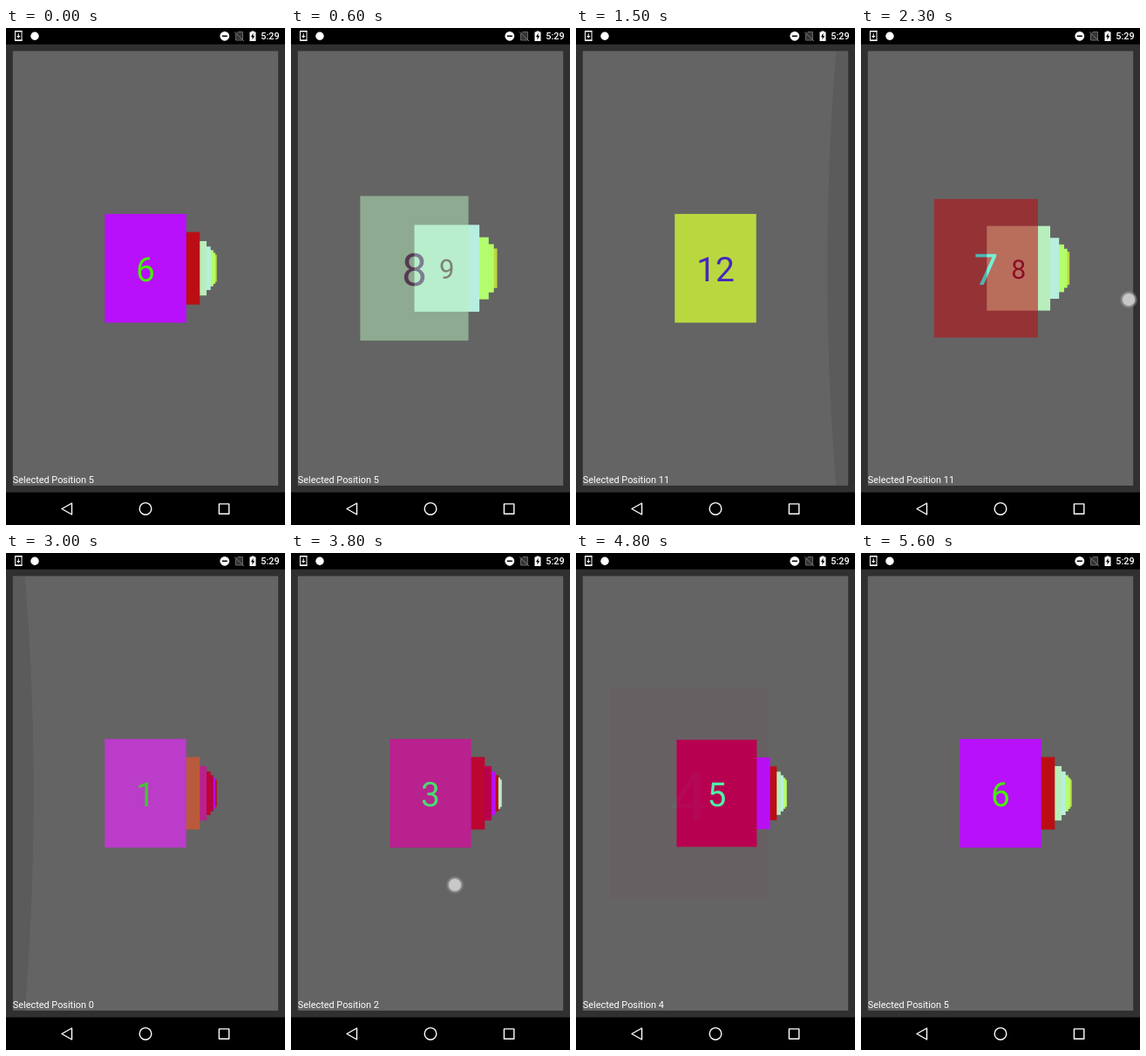
Recreate the animation shown at these times as an HTML page. Size 320 by 569 pixels, loop 5.7 s.

```html
<!DOCTYPE html>
<html>
<head>
<meta charset="utf-8">
<style>
html, body { margin: 0; width: 100%; height: 100%; overflow: hidden; background: #000; }
svg { display: block; width: 320px; height: 569px; font: 10.9px Roboto, sans-serif; fill: #fff; }
.card text { font-size: 38.9px; text-anchor: middle; text-rendering: geometricPrecision; }
.line { fill: none; stroke: #fff; }
</style>
</head>
<body>
<svg viewBox="0 0 320 569">
  <rect width="320" height="569" fill="#303030"/>
  <rect x="7.8" y="26.4" width="304.4" height="497.5" fill="#646464"/>
  <g id="cards"></g>
  <path id="leftGlow" fill="#000" fill-opacity=".09"/>
  <path id="rightGlow" fill="#000" fill-opacity=".09"/>
  <text id="label" x="7.8" y="521"/>

  <g id="statusBar">
    <rect width="320" height="18.7" fill="#000"/>
    <rect class="line" x="10.5" y="3.5" width="7.5" height="11"/>
    <path d="M10 4h8.5M10 13.8h8.5M14.3 6.3v3" class="line"/>
    <path d="M12 9h4.6l-2.3 2.6z"/>
    <circle cx="33" cy="9.3" r="4.7"/>
    <circle cx="250.8" cy="9.3" r="5.4"/>
    <path d="M247.8 8.5h6v1.6h-6z" fill="#000"/>
    <path d="M266 4.5h5.5V14h-8V7z" fill="#333" stroke="#666"/>
    <path d="M262 4.5l11 10.5" stroke="#777"/>
    <path d="M279.5 4.5h2V3.4h3v1.1h2V15h-7z"/>
    <path d="M283.6 5.8l-2.7 4.5h1.7l-.2 3.3 2.8-4.6h-1.7z" fill="#000"/>
    <text x="292.3" y="13.4" font-weight="500">5:29</text>
  </g>
  <g id="navigationBar" stroke-width="1.4" stroke-linejoin="round">
    <rect y="531.6" width="320" height="38" fill="#000"/>
    <path class="line" d="M64 550.5l11.5-6.5v13z"/>
    <circle class="line" cx="160" cy="550.4" r="6.8"/>
    <rect class="line" x="244.4" y="544.9" width="11.4" height="11.4"/>
  </g>
  <g id="touch">
    <circle r="10" fill="#999" fill-opacity=".35"/>
    <circle r="8.5" fill="#999" fill-opacity=".8"/>
    <circle r="7" fill="#c8c8c8"/>
  </g>
</svg>
<script>
const LOOP = 5700, STEP = 100;
const CARD_W = 93.4, CARD_H = 124.5, VISIBLE_AHEAD = 6;
const byId = id => document.getElementById(id);

const palette = ['#ba3cc8', '#ba5a3c', '#b9218f', '#bc0632', '#b80052', '#b810fa',
                 '#bb0e14', '#b8eebc', '#b8eede', '#b3fd70', '#b4fd64', '#b9d840'];

const smooth = u => u * u * (3 - 2 * u);
const easeOut = power => u => 1 - (1 - u) ** power;
const easeIn = power => u => u ** power;

// Each swipe carries on from the card where the previous one ended.
const swipes = [
  { start: 200, end: 1300, to: 12, ease: easeOut(1.19), glow: 'rightGlow' },
  { start: 1600, end: 2800, to: 1, ease: easeIn(1.63), glow: 'leftGlow' },
  { start: 3000, end: 3400, to: 3, ease: smooth },
  { start: 3800, end: 4100, to: 4, ease: easeOut(3) },
  { start: 4370, end: 4850, to: 5, ease: smooth },
  { start: 5020, end: 5500, to: 6, ease: smooth }
];
const touches = [
  { start: 2000, end: 2300, from: [110, 318], to: [307, 311] },
  { start: 3800, end: 3900, from: [188, 380], to: [122, 421] }
];

const progress = (t, { start, end }) => Math.min(1, Math.max(0, (t - start) / (end - start)));
const mix = (a, b, u) => a + (b - a) * u;

const cards = palette.map((color, i) => {
  const card = document.createElementNS('http://www.w3.org/2000/svg', 'g');
  const inverse = '#' + (0xffffff - parseInt(color.slice(1), 16)).toString(16).padStart(6, '0');
  card.setAttribute('class', 'card');
  card.innerHTML = `
    <rect x="${-CARD_W / 2}" y="${-CARD_H / 2}" width="${CARD_W}" height="${CARD_H}" fill="${color}"/>
    <text y="15.2" fill="${inverse}">${i + 1}</text>`;
  byId('cards').prepend(card);
  return card;
});

function placeCard(card, offset, visible) {
  const scale = 1 / (1 + offset / 2);
  const shift = Math.sign(offset) * CARD_W * (1 - 1 / (1 + Math.abs(offset) / 2));
  card.style.display = visible ? '' : 'none';
  if (!visible) return;
  card.setAttribute('opacity', Math.min(1, 1 + offset));
  card.setAttribute('transform', `translate(${160 + shift} 275.1) scale(${scale})`);
}

function drawGlow({ end, glow }, t) {
  const age = t - end;
  const size = age < 0 ? 0 : Math.max(0, 1.6 - age / 333);
  const [edge, inward] = glow === 'leftGlow' ? [7.8, size] : [312.2, -size];
  byId(glow).setAttribute('d',
    `M${edge} 26.4h${14 * inward}q${20 * inward} 248.7 0 497.5H${edge}z`);
}

function draw(t) {
  let position = 6, settled = 6;
  for (const swipe of swipes) {
    position = mix(position, swipe.to, swipe.ease(progress(t, swipe)));
    if (Math.abs(position - swipe.to) < 0.035) settled = swipe.to;
    if (swipe.glow) drawGlow(swipe, t);
  }
  byId('label').textContent = 'Selected Position ' + (settled - 1);

  const furthest = Math.ceil(position) + VISIBLE_AHEAD;
  cards.forEach((card, i) => {
    const offset = i + 1 - position;
    placeCard(card, offset, offset > -1 && i + 1 <= furthest);
  });

  const touch = touches.find(({ start, end }) => t >= start && t <= end);
  byId('touch').style.display = touch ? '' : 'none';
  if (touch) {
    const [x, y] = touch.from.map((from, axis) => mix(from, touch.to[axis], progress(t, touch)));
    byId('touch').setAttribute('transform', `translate(${x} ${y})`);
  }
}

const begin = performance.now();
function tick() {
  const t = (performance.now() - begin) % LOOP;
  draw(Math.floor(t / STEP) * STEP);
  requestAnimationFrame(tick);
}
tick();
</script>
</body>
</html>
```
